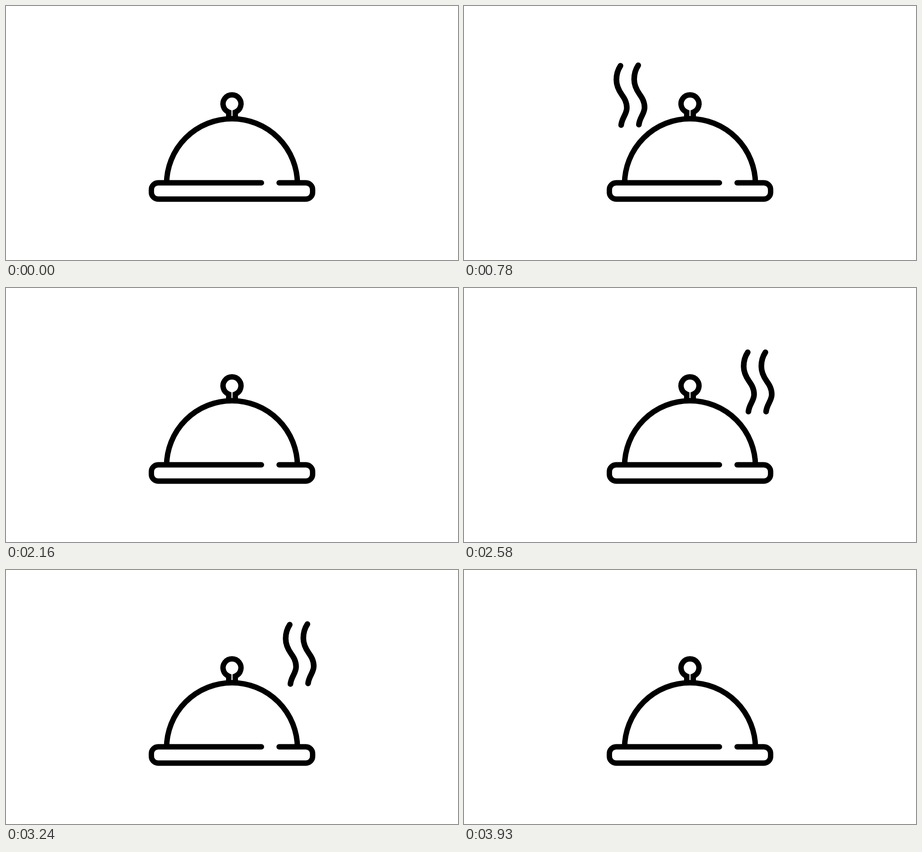
An HTML page with a canvas for the animation above (4.23 s loop, 998 by 561 pixels).

```html
<!DOCTYPE html>
<html lang="en">
<head>
<meta charset="utf-8">
<title>Hot dish</title>
<style>
html, body { margin: 0; width: 100%; height: 100%; overflow: hidden; background: #fff; }
canvas { display: block; }
</style>
</head>
<body>
<canvas id="stage" width="998" height="561"></canvas>
<script>
const ctx = document.getElementById('stage').getContext('2d');
const LOOP = 4230, STEP = 30, SECOND = 2130;
const IN = [30, 300], OUT = [1600, 1800], STOP = 1665;

const dish = new Path2D(
  'M564 390.5H336A15 15 0 0 0 321 405.5V411.5A15 15 0 0 0 336 426.5' +
  'H662A15 15 0 0 0 677 411.5V405.5A15 15 0 0 0 662 390.5H603');
const dome = new Path2D();
dome.arc(499, 393.5, 144.5, Math.PI, 2 * Math.PI);
const knob = new Path2D('M491.8 249V234.5A19.8 19.8 0 1 1 506.2 234.5V249');
const wisp = new Path2D(
  'M0 0C-6 9 -9 20 -9 31C-9 43 -4 54 3 64C8 71 14 80 14 93C14 107 3 115 1.5 131');

// Tip position at a local time, and rising speed in px per ms
const wisps = [
  { start: 0, x: 345.5, y: 132, at: 780, speed: 0.0388 },
  { start: 0, x: 384.7, y: 131, at: 780, speed: 0.0325 },
  { start: SECOND, x: 626.5, y: 142, at: 450, speed: 0.0322 },
  { start: SECOND, x: 665.5, y: 142, at: 450, speed: 0.0341 }
];

const ramp = (t, [a, b]) => Math.min(1, Math.max(0, (t - a) / (b - a)));

function stroke(path, width, cap) {
  ctx.lineWidth = width;
  ctx.lineCap = cap;
  ctx.stroke(path);
}

function drawWisp(w, time) {
  const t = time - w.start;
  const alpha = ramp(t, IN) * (1 - ramp(t, OUT));
  if (alpha <= 0) return;
  ctx.save();
  ctx.globalAlpha = alpha;
  ctx.translate(w.x, w.y - w.speed * (Math.min(t, STOP) - w.at));
  stroke(wisp, 12.5, 'round');
  ctx.restore();
}

function draw(now) {
  const time = Math.floor((now % LOOP) / STEP) * STEP;
  ctx.fillStyle = '#fff';
  ctx.fillRect(0, 0, 998, 561);
  ctx.strokeStyle = '#000';
  stroke(dish, 11.8, 'round');
  stroke(dome, 12, 'butt');
  stroke(knob, 12, 'butt');
  wisps.forEach(w => drawWisp(w, time));
}

let begin = null;
function tick(now) {
  if (begin === null) begin = now;
  draw(now - begin);
  requestAnimationFrame(tick);
}
draw(0);
requestAnimationFrame(tick);
</script>
</body>
</html>
```
